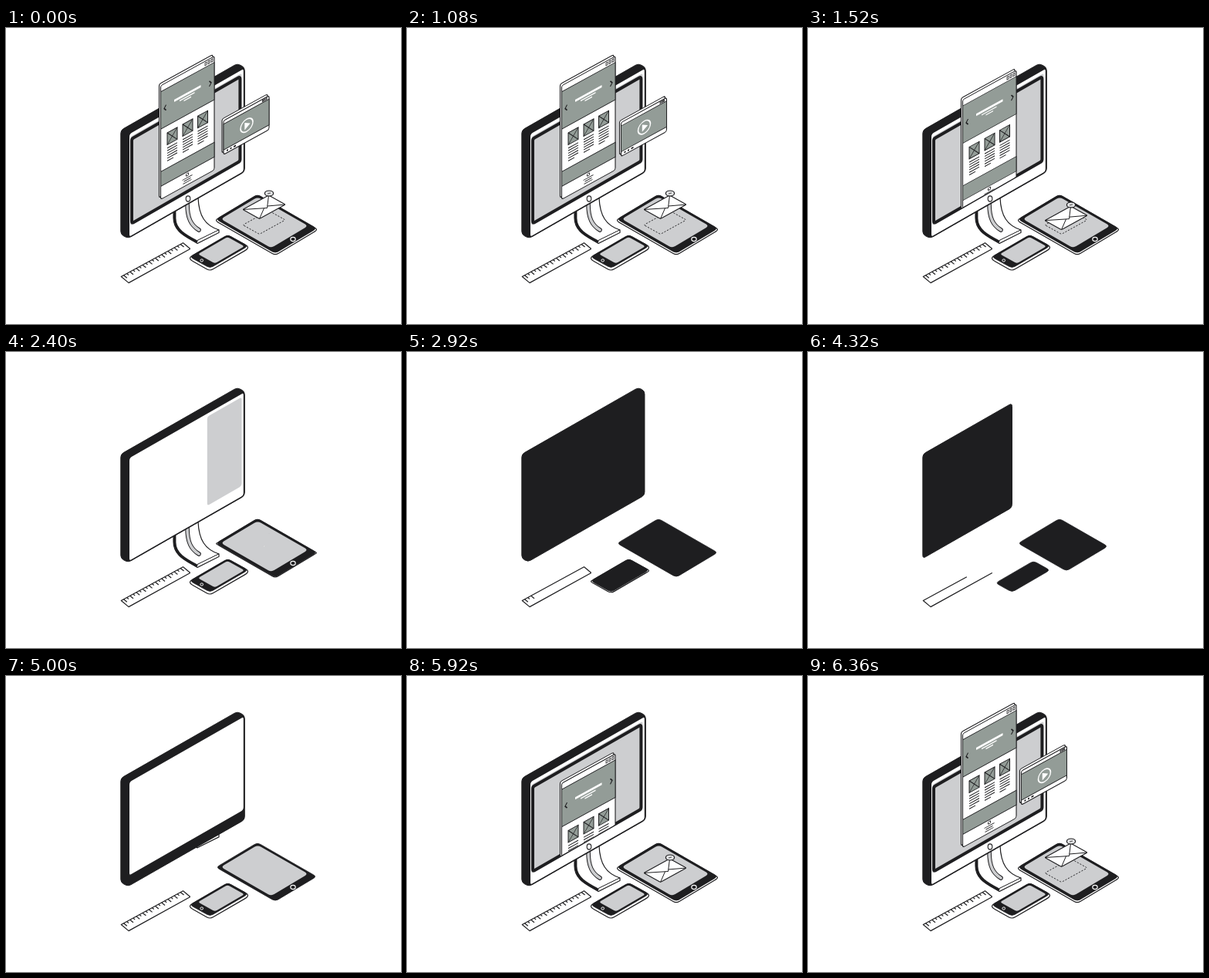
An HTML page with a canvas that plays this animation: 512x384 px, repeating every 6.4 s.

```html
<!DOCTYPE html>
<html lang="en">
<head>
<meta charset="utf-8">
<title>Isometric devices</title>
<style>
html, body { margin: 0; width: 100%; height: 100%; overflow: hidden; background: #fff; }
canvas { display: block; }
</style>
</head>
<body>
<canvas id="stage" width="512" height="384"></canvas>
<script>
const ctx = document.getElementById('stage').getContext('2d');
const LOOP = 6400, STEP = 40;
const INK = '#1e1e20', GRAY = '#cdced0', GREEN = '#939c97', WHITE = '#fff';
let now = 0;

const clamp = v => Math.min(1, Math.max(0, v));

// Presence 1 -> 0 between a and b (ease in), back to 1 between c and d (ease out)
function presence(a, b, c, d, power = 2) {
  return now < 3800
    ? 1 - clamp((now - a) / (b - a)) ** power
    : 1 - (1 - clamp((now - c) / (d - c))) ** power;
}

function paint(fill, stroke, width = 1.2) {
  if (fill) { ctx.fillStyle = fill; ctx.fill(); }
  if (stroke) { ctx.strokeStyle = stroke; ctx.lineWidth = width; ctx.stroke(); }
}

// Polygon with softened corners
function shape(points, soft, fill, stroke, width) {
  const dist = (p, q) => Math.hypot(q[0] - p[0], q[1] - p[1]);
  const pts = points.filter((p, i) => dist(p, points.at(i - 1)) > 0.3);
  const toward = (p, q) => {
    const f = Math.min(soft / dist(p, q), 0.5);
    return [p[0] + (q[0] - p[0]) * f, p[1] + (q[1] - p[1]) * f];
  };
  ctx.beginPath();
  pts.forEach((p, i) => {
    ctx.lineTo(...toward(p, pts.at(i - 1)));
    ctx.quadraticCurveTo(...p, ...toward(p, pts[(i + 1) % pts.length]));
  });
  ctx.closePath();
  paint(fill, stroke, width);
}

function lines(color, width, ...paths) {
  ctx.beginPath();
  for (const path of paths) path.forEach((p, i) => i ? ctx.lineTo(...p) : ctx.moveTo(...p));
  paint(null, color, width);
}

function oval(x, y, rx, ry, fill, stroke, width) {
  ctx.beginPath();
  ctx.ellipse(x, y, rx, ry, 0, 0, 7);
  paint(fill, stroke, width);
}

function curve(d, fill, stroke, width) {
  const p = new Path2D(d);
  if (fill) { ctx.fillStyle = fill; ctx.fill(p); }
  if (stroke) { ctx.strokeStyle = stroke; ctx.lineWidth = width; ctx.stroke(p); }
}

function scoped(draw) { ctx.save(); draw(); ctx.restore(); }

function clipX(x0, x1) {
  ctx.beginPath();
  ctx.rect(x0, 0, x1 - x0, 384);
  ctx.clip();
}

// Part of the parallelogram o + u*a + v*b
function quad(o, a, b, u0, u1, v0, v1) {
  return [[u0, v0], [u0, v1], [u1, v1], [u1, v0]].map(([u, v]) =>
    [o[0] + u * a[0] + v * b[0], o[1] + u * a[1] + v * b[1]]);
}

function stand() {
  const k = presence(2420, 2800, 4990, 5340);
  if (k <= 0) return;
  scoped(() => {
    ctx.translate(0, -60 * (1 - k));
    curve('M217 232V246C217 264 232 270 248 279.5L276 265.5V262C258 256 250 244 249 220Z', WHITE, INK, 1.2);
    curve('M218.7 234V247C219 262 232 269 248 277.5', null, INK, 3.4);
    curve('M248 275.5L276 261.8', null, INK, 1);
    const slot = 'M235 228C235 247 240 256 250 262';
    ctx.lineCap = 'round';
    curve(slot, null, INK, 5.6);
    curve(slot, null, GRAY, 3.6);
  });
}

function monitor() {
  const w = 151 * presence(2980, 3600, 4000, 4620);
  if (w <= 0) return;
  const e = presence(2860, 3020, 4560, 4760);
  const rise = 0.572 * w, dx = 9.5 * e, dy = 5 * e;
  shape([[148.8, 267.8], [148.8, 132.6], [148.8 + w, 132.6 - rise], [148.8 + w + dx, 132.6 - rise + dy],
    [148.8 + w + dx, 267.8 - rise + dy], [148.8 + dx, 267.8 + dy]], 4, INK, INK, 1);

  const f = 134.6 * presence(2560, 2900, 4700, 5130);
  if (f > 0) shape([[159.3, 137.2], [308.5, 51.8], [308.5, 51.8 + f], [159.3, 137.2 + f]], 4, WHITE, INK, 1.4);

  const leaving = now < 3800;
  const side = [0, 115.3], across = [144.5, -82.8];
  const panel = presence(2080, 2465, 5360, 5640);
  const u = leaving ? 1 - panel : 0;
  if (panel > 0) shape(quad([161, 141.3], across, side, u, u + panel, 0, 1), 3, GRAY);
  const bezel = presence(1880, 2300, 5480, 5760);
  if (bezel > 0) scoped(() => {
    const x = leaving ? 306 - 146 * bezel : 160;
    clipX(x, x + 146 * bezel);
    shape([[163, 143.8], [303.4, 63.2], [303.4, 172.8], [163, 253.4]], 2.5, null, INK, 4);
  });

  const dot = presence(2060, 2320, 5620, 5840);
  if (dot > 0) oval(236, 221.5, 2.8 * dot, 3.6 * dot, WHITE, INK, 1.1);
}

// Skewed window: back plate, front plate, title bar with buttons
function windowFrame(x, y, w, h, bar) {
  ctx.transform(1, -0.55, 0, 1, x, y);
  const plate = (dx, dy) => shape([[dx, dy], [w + dx, dy], [w + dx, h + dy], [dx, h + dy]], 2.5, WHITE, INK, 1.1);
  plate(-2, -3.2);
  plate(0, 0);
  for (let i = 0; i < 3; i++) {
    ctx.beginPath();
    ctx.rect(w - 4 - i * bar * 0.5, bar * 0.25, bar * 0.25, bar * 0.45);
    paint(null, INK, 0.8);
  }
}

function band(y, w, h) {
  ctx.beginPath();
  ctx.rect(0, y, w, h);
  paint(GREEN, INK, 0.9);
}

function page() {
  const k = presence(1360, 1840, 5740, 6220);
  if (k <= 0) return;
  scoped(() => {
    ctx.beginPath();
    [[161, 0], [306, 0], [306, 172], [161, 255]].forEach(p => ctx.lineTo(...p));
    ctx.clip();
    windowFrame(200.5, 74.8 + 165 * (1 - k), 69.5, 147.5, 8);
    ctx.translate(0, 1.7);
    band(6.3, 69.5, 48.5);
    band(110, 69.5, 19);
    lines(INK, 1.3, [[7, 27], [4.5, 30.5], [7, 34]], [[63, 27], [65.5, 30.5], [63, 34]]);
    lines(WHITE, 3, [[17.5, 27.5], [52, 27.5]]);
    lines(WHITE, 1.4, [[24.5, 31.5], [44, 31.5]], [[30, 34.5], [39.5, 34.5]]);
    for (const x of [8.5, 28.5, 48]) {
      ctx.beginPath();
      ctx.rect(x, 64.2, 13, 15.5);
      paint(GREEN, INK, 1);
      lines(INK, 0.8, [[x, 64.2], [x + 13, 79.7]], [[x + 13, 64.2], [x, 79.7]]);
      for (let i = 0; i < 6; i++)
        lines(INK, 1.1, [[x, 84 + i * 3.3], [x + (i == 5 ? 8 : 13), 84 + i * 3.3]]);
    }
    oval(34.5, 132.5, 1.7, 1.7, WHITE, INK, 0.9);
    [6.5, 4.5, 5.5].forEach((r, i) => lines(INK, 0.9, [[34.5 - r, 136.5 + i * 2.7], [34.5 + r, 136.5 + i * 2.7]]));
  });
}

function video() {
  const k = presence(1040, 1420, 6080, 6400, 1.22);
  if (k <= 0) return;
  scoped(() => {
    clipX(270.5, 512);
    windowFrame(282 - 70 * (1 - k), 120.2 + 38.5 * (1 - k), 59, 44, 4.5);
    band(4.5, 59, 33.5);
    oval(30, 22.5, 8, 8, null, WHITE, 1.5);
    shape([[27.3, 17.8], [34.7, 22.5], [27.3, 27.2]], 0.5, WHITE);
    lines(INK, 2, [[4, 41], [6, 41]], [[8.5, 41], [10.5, 41]], [[13, 41], [16, 41]]);
  });
}

function ruler() {
  const k = presence(2980, 3540, 4000, 4560);
  if (k <= 0) return;
  const edge = 206;
  scoped(() => {
    ctx.lineJoin = 'round';
    if (k < 1) ctx.setLineDash([edge * k, edge * 2]);
    lines(INK, 1.2, [[238.8, 286.5], [159, 330.6], [149.3, 322.5], [229.5, 278.8], [238.8, 286.5]]);
  });
  const shown = 19 * presence(2400, 2960, 4620, 4960);
  for (let i = 0; i < shown; i++) {
    const x = 152.5 + i * 4.1, y = 320.8 - i * 2.23, len = i % 2 ? 3 : 5.5;
    lines(INK, 1.2, [[x, y], [x + len * 0.78, y + len * 0.62]]);
  }
}

// Slab with a white edge of height h below its top face
function slab(face, h) {
  const [left, top, right, bottom] = face;
  const down = p => [p[0], p[1] + h];
  if (h > 0) shape([left, top, right, down(right), down(bottom), down(left)], 4.5, WHITE, INK, 1.2);
  shape(face, 4.5, INK, INK, 0.8);
}

function tablet() {
  const k = presence(2980, 3520, 4000, 4560);
  if (k <= 0) return;
  const o = [272.5, 248.2], a = [76.5, 44], b = [53.5, -32];
  slab(quad(o, a, b, 0, k, 0, 1), 2.6 * presence(2200, 2440, 5360, 5640));
  const s = presence(2420, 2900, 4480, 4900);
  if (s > 0) shape(quad(o, a, b, 0.035, 0.035 + 0.855 * s, 0.06, 0.955), 5, GRAY);
  const dot = presence(2420, 2720, 4640, 4920);
  if (dot > 0) oval(372, 274, 3.2 * dot, 2.6 * dot, null, WHITE, 1.1);
}

function phone() {
  const k = presence(2980, 3600, 4000, 4560);
  if (k <= 0) return;
  const o = [238.5, 297], a = [49, -28.5], b = [26, 14.5];
  const [left, bottom, right, top] = quad(o, a, b, 0, 1, 1 - k, 1);
  slab([left, top, right, bottom], 3.6 * presence(2700, 2980, 4600, 4900));
  const s = presence(2440, 2840, 4520, 4900);
  if (s > 0) shape(quad(o, a, b, 0.17, 0.95, 0.92 - 0.84 * s, 0.92), 3, GRAY);
  const dot = presence(2440, 2720, 4640, 4920);
  if (dot > 0) oval(253.7, 301.5, 1.9 * dot, 1.6 * dot, null, WHITE, 1);
}

function mail() {
  const size = presence(2000, 2410, 5560, 5880);
  if (size <= 0) return;
  const up = presence(1200, 1580, 5920, 6320);
  const corners = [[-27.5, 3.5], [6, -15], [27.5, -3], [-6, 15.5]];
  const [left, top, right, bottom] = corners;
  const at = (x, y, draw) => scoped(() => { ctx.translate(x, y); draw(); });

  if (up > 0) at(334.5, 252, () => {
    ctx.globalAlpha = clamp(up * 5);
    ctx.setLineDash([2.2, 1.8]);
    shape(corners, 2, null, INK, 0.9);
  });
  at(334.5, 252 - 20 * up, () => {
    ctx.scale(size, size);
    shape(corners, 1.5, WHITE, INK, 1.1);
    lines(INK, 1, [left, [4, 1.5], top], [bottom, [0, 1.8]], [right, [4.3, -1]]);
  });
  at(341, 235.5 - 21 * up, () => {
    ctx.scale(size, size);
    oval(0, 0, 5.6, 3.5, '#e2e3e4', INK, 1.2);
    lines(INK, 0.8, [[-2, 0.5], [2, -0.5]]);
  });
}

function frame(time) {
  now = Math.floor(time % LOOP / STEP) * STEP;
  ctx.fillStyle = WHITE;
  ctx.fillRect(0, 0, 512, 384);
  [stand, monitor, page, video, ruler, tablet, phone, mail].forEach(draw => draw());
}

let start;
function tick(time) {
  start ??= time;
  frame(time - start);
  requestAnimationFrame(tick);
}
frame(0);
requestAnimationFrame(tick);
</script>
</body>
</html>
```
